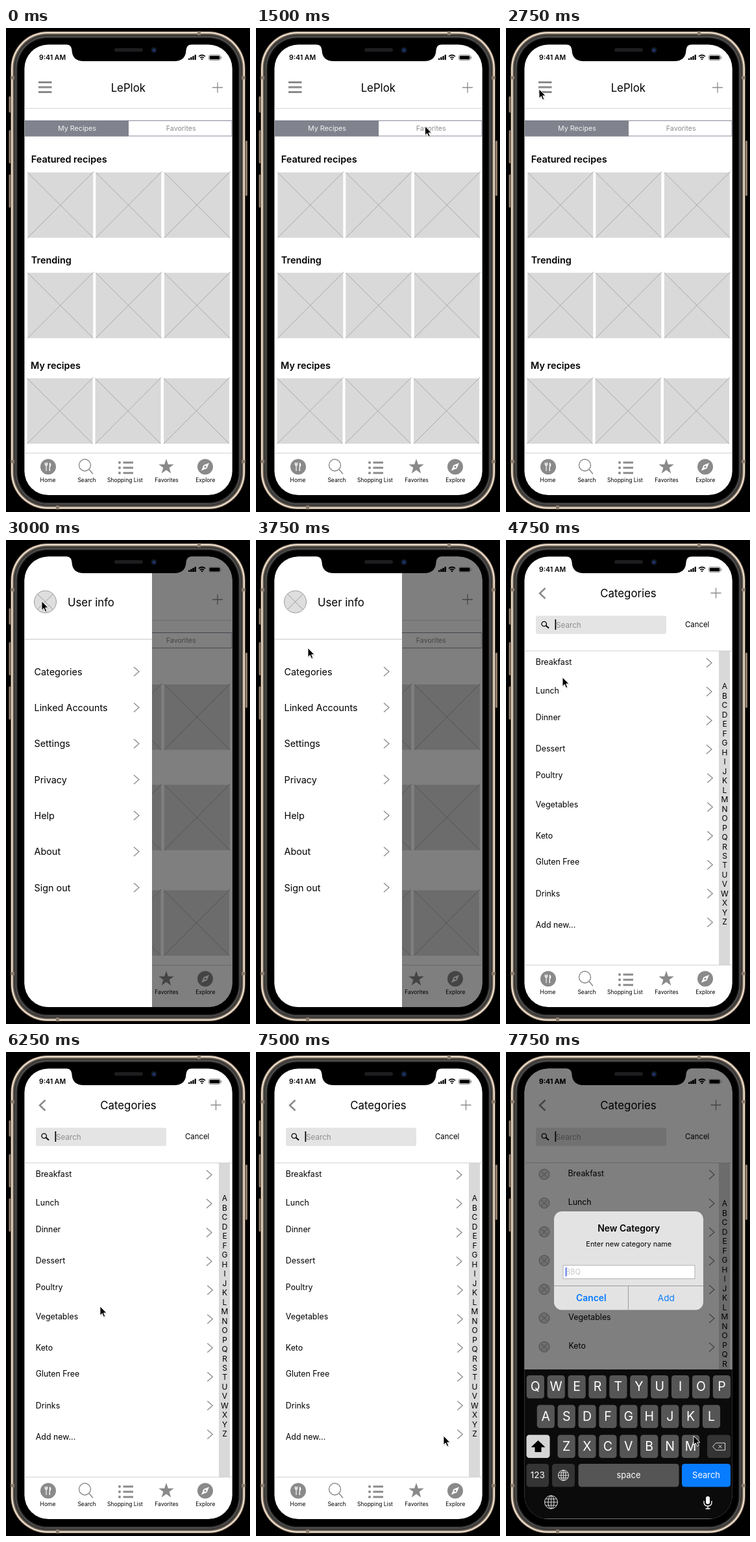
Animation of 376 by 744 pixels, one loop 8 s. Source, as an HTML page:

```html
<!DOCTYPE html>
<html lang="en">
<head>
<meta charset="utf-8">
<title>Recipe app prototype</title>
<style>
html, body { margin: 0; width: 100%; height: 100%; overflow: hidden; background: #000; }
svg { display: block; width: 376px; height: 744px; }
text { font-family: Inter, Roboto, sans-serif; white-space: pre; }
</style>
</head>
<body>
<svg id="stage" viewBox="0 0 376 744" xmlns="http://www.w3.org/2000/svg"></svg>
<script>
const GRAY = '#8a8a8a', BLUE = '#087cff';
const LOOP = 8000, STEP = 250;

const rect = (x, y, w, h, fill, extra = '') =>
  `<rect x="${x}" y="${y}" width="${w}" height="${h}" fill="${fill}" ${extra}/>`;
const circle = (x, y, r, fill, extra = '') =>
  `<circle cx="${x}" cy="${y}" r="${r}" fill="${fill}" ${extra}/>`;
const line = (d, color = GRAY, width = 1, extra = '') =>
  `<path d="${d}" fill="none" stroke="${color}" stroke-width="${width}" ${extra}/>`;
const shape = (d, fill) => `<path d="${d}" fill="${fill}"/>`;
const group = (id, body) => `<g id="${id}">${body}</g>`;
// y is the middle of the capitals
const text = (x, y, size, str, fill = '#000', anchor = 'start', weight = 400) =>
  `<text x="${x}" y="${y + size * 0.364}" font-size="${size}" fill="${fill}" text-anchor="${anchor}" font-weight="${weight}">${str}</text>`;
const label = (x, y, size, str, fill, weight) => text(x, y, size, str, fill, 'middle', weight);
const chevron = (x, y) => line(`M${x - 4} ${y - 7}l8 7-8 7`, GRAY, 1.3);
const plus = (x, y) => line(`M${x - 8} ${y}h16M${x} ${y - 8}v16`, GRAY, 1.3);
const crossed = (x, y, r) => {
  const d = r * 0.707;
  return circle(x, y, r, '#dedede', 'stroke="#9a9a9a"') +
    line(`M${x - d} ${y - d}l${2 * d} ${2 * d}M${x + d} ${y - d}l${-2 * d} ${2 * d}`, '#9a9a9a');
};

function device() {
  const ring = (inset, fill) => rect(7 + inset, 5 + inset, 362 - 2 * inset, 735 - 2 * inset, fill, `rx="${57 - inset}"`);
  const buttons = [[4.5, 105, 25], [4.5, 157, 51], [4.5, 225, 51], [369, 173, 85]]
    .map(([x, y, h]) => rect(x, y, 3, h, '#8f7c69', 'rx="1.5"')).join('');
  const bands = [[7, 74, 6, 5], [363, 74, 6, 5], [7, 664, 6, 5], [363, 664, 6, 5], [295, 5, 5, 6], [77, 734, 5, 6]]
    .map(b => rect(...b, '#8b7d6d')).join('');
  return buttons + ring(0, '#5b4d41') + ring(1, '#ead9c6') + ring(3.5, '#6e6459') + ring(5, '#3c3a38') +
    ring(8.3, '#6a6866') + ring(9.2, '#1c1c1c') + bands + ring(11, '#000');
}

function notch() {
  return shape('M93 25Q101 26 101.500 34Q102 51 120 51H259Q277 51 277.500 34Q278 26 286 25Z', '#000') +
    rect(167, 31, 44, 5.500, '#1d1d1f', 'rx="2.7"') +
    circle(228, 34, 4.500, '#111827') + circle(228, 34, 2.300, '#1d356b');
}

function statusIcons() {
  const bars = [0, 1, 2, 3].map(i => rect(281 + i * 3.2, 46.5 - i * 1.8, 2.3, 2.5 + i * 1.8, '#000', 'rx=".6"')).join('');
  return bars +
    line('M297 43.700Q302 39.500 307 43.700M299 46Q302 43.500 305 46', '#000', 1.5) +
    shape('M300.300 47.400Q302 46 303.700 47.400L302 49.200Z', '#000') +
    rect(312.5, 41.5, 18, 8, 'none', 'rx="2.3" stroke="#777" stroke-width=".8"') +
    rect(313.7, 42.7, 15.6, 5.6, '#000', 'rx="1.3"') + rect(331.3, 44, 1, 3, '#777');
}
const clock = text(51, 45, 10.5, '9:41 AM', '#000', 'start', 600);

function tabBar() {
  const star = [...Array(10).keys()].map(i => {
    const r = i % 2 ? 4.9 : 12.4, a = i * Math.PI / 5;
    return `${247 + r * Math.sin(a)},${674.6 - r * Math.cos(a)}`;
  }).join(' ');
  const list = [668, 676, 684].map(y => circle(175, y, 2, GRAY) + rect(180.5, y - 1.5, 15.5, 3, GRAY)).join('');
  const names = [[64.5, 'Home'], [124.5, 'Search'], [183.5, 'Shopping List'], [247.5, 'Favorites'], [307.3, 'Explore']];
  return line('M28 653.500H349', '#d2d2d2') +
    circle(65, 674.5, 12, GRAY) +
    line('M62 668v4M60.300 668v3.500q1.700 2 3.400 0V668M62 672v9', '#fff', 1.1) +
    shape('M67 668q3 1 2 6h-1v7h-1.500z', '#fff') +
    circle(121.5, 672, 9, 'none', `stroke="${GRAY}" stroke-width="1.4"`) + line('M128 678.500l6 7', GRAY, 1.5) +
    list + `<polygon points="${star}" fill="${GRAY}"/>` +
    circle(307, 674.5, 12, GRAY) + shape('M313 668.500l-3.500 8.500-8.500 3.500 3.500-8.500z', '#fff') + circle(307, 674.5, 1.6, GRAY) +
    names.map(([x, s]) => label(x, 695, 8.5, s)).join('');
}

const page = rect(28, 25, 321, 693, '#fff');
const shade = rect(28, 25, 321, 693, '#000', 'opacity=".5"');

function home() {
  const tile = (x, y) => rect(x, y, 101, 100.5, '#d9d9d9') +
    line(`M${x} ${y}l101 100.500M${x} ${y + 100.5}L${x + 102} ${y - 1.5}`, '#a3a3a3', 0.9);
  const section = (title, x, y) => text(x + 5.5, y - 20, 14.4, title, '#000', 'start', 600) +
    [0, 105, 210.5].map(dx => tile(x + dx, y)).join('');
  return page + clock + statusIcons() +
    [83.5, 91, 98.5].map(y => rect(50, y - 1.5, 20.5, 3, GRAY)).join('') +
    label(188.3, 91.5, 16.8, 'LePlok') + plus(326, 91.5) +
    line('M28 123.500H349', '#d6d6d6') +
    rect(29.5, 142.5, 318.5, 23.5, '#fff', 'stroke="#8b879d"') + rect(29, 142, 160, 24.5, '#80828d') +
    label(109.5, 154.5, 10.7, 'My Recipes', '#f4f4f4') + label(269.7, 154.5, 10.6, 'Favorites', GRAY) +
    section('Featured recipes', 33.3, 222) + section('Trending', 33.3, 376.3) + section('My recipes', 32.5, 538.5) +
    tabBar();
}

function menu() {
  const items = ['Categories', 'Linked Accounts', 'Settings', 'Privacy', 'Help', 'About', 'Sign out'];
  return shade + statusIcons() +
    rect(28, 25, 197, 693, '#fff') + crossed(60.5, 95, 17) + text(95, 96, 16.8, 'User info') +
    line('M28 152.500H225', '#c9c9c9') +
    items.map((s, i) => text(43.5, 202.3 + i * 55.35, 14.4, s) + chevron(201, 202.2 + i * 55.35)).join('');
}

function alphabet(top) {
  return rect(328, 171, 17, 482, '#d9d9d9') +
    [...'ABCDEFGHIJKLMNOPQRSTUVWXYZ'].map((c, i) => label(337, top + i * 14.48, 12, c)).join('');
}

function categoryHeader() {
  return page + clock + statusIcons() +
    line('M60.500 74l-8.500 8 8.500 8', GRAY, 2.5) + label(188.5, 81.5, 16.8, 'Categories') + plus(323.5, 81.5) +
    rect(46, 116.5, 201, 28, '#e4e4e4', 'rx="3"') +
    circle(58.7, 129, 3.7, 'none', 'stroke="#000" stroke-width="1.3"') + line('M61.500 131.500l4.500 4', '#000', 1.8) +
    rect(75.5, 122, 1.7, 16, '#000') + text(77, 131, 11.7, 'Search', '#8e8e8e') +
    text(276, 130, 11.4, 'Cancel') + line('M28 170.500H349', '#d2d2d2');
}

const rows = [['Breakfast', 187.5], ['Lunch', 231], ['Dinner', 272], ['Dessert', 320.5], ['Poultry', 361],
  ['Vegetables', 406], ['Keto', 454.5], ['Gluten Free', 494.5], ['Drinks', 543.5], ['Add new...', 591.5]];

function categories() {
  return categoryHeader() + alphabet(225) +
    rows.map(([s, y], i) => text(45.8, y, 12.4, s) + chevron(i < 4 ? 313 : 314.3, 188.7 + i * 44.35)).join('') +
    tabBar();
}

function keyboard() {
  const key = (x, y, w, s, fill = '#555', size = 19.5) =>
    rect(x, y, w, 35.5, fill, 'rx="4.5"') + label(x + w / 2, y + 17.3, size, s, '#fff');
  const keyRow = (letters, x, y) => [...letters].map((c, i) => key(x + i * 31.9, y, 27.2, c)).join('');
  const globe = (x, y, r) => circle(x, y, r, 'none', 'stroke="#e8e8e8"') +
    `<ellipse cx="${x}" cy="${y}" rx="${r * 0.45}" ry="${r}" fill="none" stroke="#e8e8e8"/>` +
    line(`M${x - r} ${y}h${2 * r}M${x} ${y - r}v${2 * r}M${x - r * 0.85} ${y - r * 0.5}h${r * 1.7}M${x - r * 0.85} ${y + r * 0.5}h${r * 1.7}`, '#e8e8e8', 0.9);
  return rect(28, 488, 321, 230, '#0b0b0b') +
    keyRow('QWERTYUIOP', 31.7, 497) + keyRow('ASDFGHJKL', 47.7, 542.5) + keyRow('ZXCVBNM', 79.5, 588.5) +
    key(31.5, 588.5, 36, '', '#d5d5d5') + shape('M49.500 597l11 10.500h-6V615h-10v-7.500h-6z', '#000') +
    key(310, 588.5, 36, '', '#343434') +
    line('M318.500 606.500l5-5.500H337.500v11h-14zM327.500 604l5 5m0-5l-5 5', '#ddd', 1) +
    key(31.5, 633, 34.5, '123', '#343434', 13.4) + key(71, 633, 35, '', '#343434') + globe(88.5, 650.8, 8) +
    key(111.5, 633, 155, 'space', '#555', 12.9) + key(271, 633, 75, 'Search', BLUE, 12.9) +
    globe(69.5, 692, 10) + rect(308, 683, 6, 12, '#fff', 'rx="3"') +
    line('M305 690v2q0 6 6 6t6-6v-2M311 698v4M307.500 702h7', '#fff', 1.3) +
    line('M57 717.500H320', '#777', 1);
}

function dialog() {
  return rect(74, 245, 230, 151.5, '#e3e3e3', 'rx="12"') +
    label(189.3, 271, 13.9, 'New Category', '#000', 600) + label(189.3, 295, 10.9, 'Enter new category name') +
    rect(88, 328, 203, 20.5, '#fff', 'stroke="#b4b4b4"') +
    text(92, 338, 11.1, 'BBQ', '#c9c9c9') + rect(91.7, 331, 1.6, 14, '#4468ee') +
    line('M74 359.500H304M188.500 359.500V396.500', '#9d9d9d') +
    label(131.3, 378, 13.9, 'Cancel', BLUE, 600) + label(246.8, 378, 13.6, 'Add', BLUE);
}

function newCategory() {
  const shifted = rows.slice(0, 7).map(([s], i) => {
    const y = 188 + i * 44.2;
    return crossed(59, y, 8) + text(95.5 + i * 0.15, y - 1.5, 12.4, s) + chevron(317, y + 0.5);
  }).join('');
  return categoryHeader() + alphabet(233) + shifted + shade + clock + statusIcons() + dialog() + keyboard();
}

const arrow = 'M0 0V15.500L3.600 12.200 6 18 8.600 16.900 6.200 11.200H11Z';
const stage = document.getElementById('stage');
stage.innerHTML =
  '<defs><clipPath id="screen"><rect x="28.400" y="25.500" width="320.300" height="692.500" rx="37"/></clipPath></defs>' +
  rect(0, 0, 376, 744, '#000') + device() +
  `<g clip-path="url(#screen)">${group('home', home())}${group('menu', menu())}${group('categories', categories())}${group('newCategory', newCategory())}</g>` +
  notch() +
  group('cursor', `<g transform="translate(0 1) scale(.9)"><path d="${arrow}" transform="translate(1 1.500)" opacity=".18"/>` +
    `<path d="${arrow}" stroke="#fff"/></g>`);

const part = Object.fromEntries(['home', 'menu', 'categories', 'newCategory', 'cursor']
  .map(id => [id, document.getElementById(id)]));

// time, x, y of the pointer tip
const path = [
  [750, 366, 170], [1250, 297, 158], [1750, 224, 142], [2250, 136, 119], [2750, 51, 93],
  [3000, 55, 93], [3250, 57, 98], [3750, 80, 165], [4000, 91, 201], [4250, 94, 211], [4500, 87, 210],
  [5500, 87, 210], [5750, 92, 228], [6250, 145, 390], [6750, 212, 535], [7250, 280, 583], [7500, 289, 589], [8000, 289, 589]
];

function pointer(t) {
  const i = Math.max(1, path.findIndex(p => p[0] >= t));
  const [t0, x0, y0] = path[i - 1], [t1, x1, y1] = path[i];
  const k = (t - t0) / (t1 - t0);
  return [x0 + (x1 - x0) * k, y0 + (y1 - y0) * k];
}

function show(el, on) { el.style.display = on ? '' : 'none'; }

function render(ms) {
  const t = Math.floor((ms % LOOP) / STEP) * STEP;
  show(part.home, t < 4750);
  show(part.menu, t >= 3000 && t < 4750);
  show(part.categories, t >= 4750 && t < 7750);
  show(part.newCategory, t >= 7750);
  show(part.cursor, t >= 750);
  if (t >= 750) part.cursor.setAttribute('transform', `translate(${pointer(t)})`);
}

const start = performance.now();
function tick() {
  render(performance.now() - start);
  requestAnimationFrame(tick);
}
tick();
</script>
</body>
</html>
```
